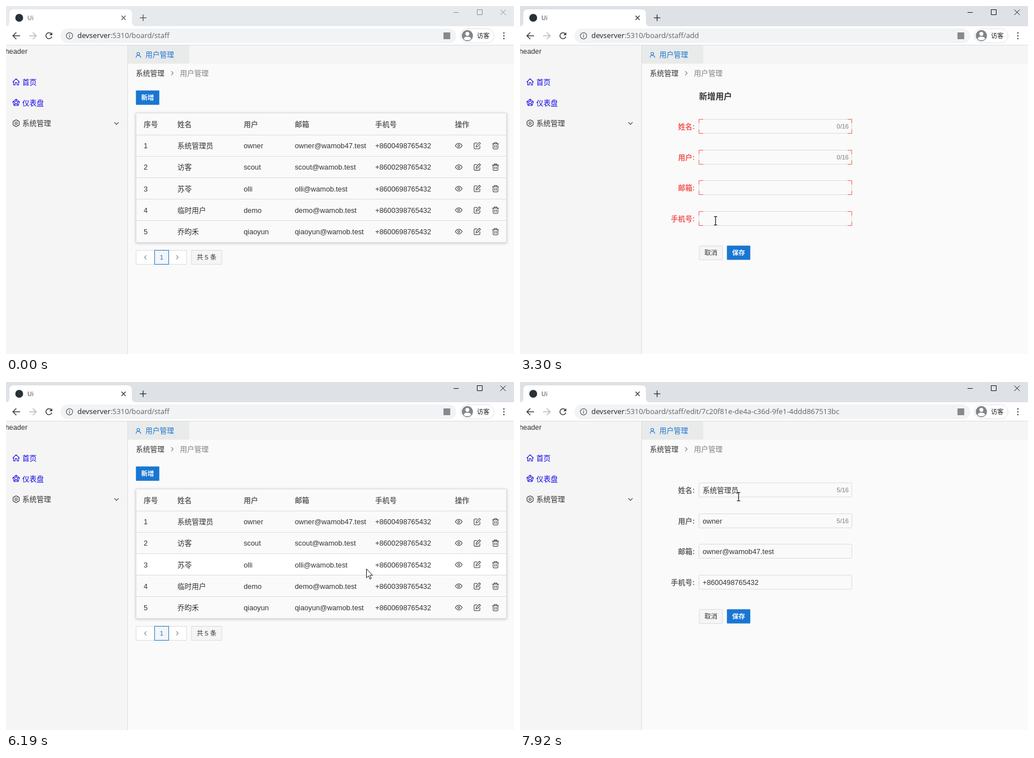
Animation of 904 by 619 pixels, one loop 7.99 s. Source, as an HTML page:

```html
<!DOCTYPE html>
<html lang="zh-CN">
<head>
<meta charset="utf-8">
<title>Ui</title>
<style>
html, body { margin: 0; width: 100%; height: 100%; overflow: hidden; background: #fafafa; }
svg { display: block; width: 904px; height: 619px; }
text { font: 12.74px "Liberation Sans", "Noto Sans CJK SC", "Noto Sans CJK", sans-serif; white-space: pre; }
.ui { font-family: "Open Sans", "Noto Sans CJK SC", "Noto Sans CJK", sans-serif; }
.icon { fill: none; stroke-width: 1.05; stroke-linejoin: round; stroke-linecap: round; }
</style>
</head>
<body>
<svg id="stage" viewBox="0 0 904 619"></svg>
<script>
const LOOP = 7990;
const BLUE = '#1976d2', INK = '#333', LINE = '#dcdcdc', RED = '#f45b57';
const stage = document.getElementById('stage');

const people = [
  ['系统管理员', 'owner', 'owner@wamob47.test', '+8600498765432'],
  ['访客', 'scout', 'scout@wamob.test', '+8600298765432'],
  ['苏苓', 'olli', 'olli@wamob.test', '+8600698765432'],
  ['临时用户', 'demo', 'demo@wamob.test', '+8600398765432'],
  ['乔昀禾', 'qiaoyun', 'qiaoyun@wamob.test', '+8600698765432']
];
const host = 'devserver', base = ':5310/board/staff';
const key = '7c20f81e-de4a-c36d-9fe1-4ddd867513bc';
const paths = { list: '', add: '/add', info: '/info/' + key, edit: '/edit/' + key };

// Drawing helpers
const text = (x, y, s, fill = INK, more = '') => `<text x="${x}" y="${y}" fill="${fill}" ${more}>${s}</text>`;
const rect = (x, y, w, h, fill, more = '') => `<rect x="${x}" y="${y}" width="${w}" height="${h}" fill="${fill}" ${more}/>`;
const line = (d, stroke = LINE, more = '') => `<path d="${d}" fill="none" stroke="${stroke}" ${more}/>`;
const icon = (x, y, d, color = INK) => `<path class="icon" transform="translate(${x} ${y})" d="${d}" stroke="${color}"/>`;
const group = (id, body, more = '') => `<g id="${id}" ${more}>${body}</g>`;
const middle = size => `text-anchor="middle" style="font-size:${size}px"`;

const glyph = {
  eye: 'M-6 0Q-3.5-4.2 0-4.2T6 0Q3.5 4.2 0 4.2T-6 0M-1.8 0a1.8 1.8 0 1 0 3.6 0a1.8 1.8 0 1 0-3.6 0',
  edit: 'M0-4.8H-4.2Q-5.4-4.8-5.4-3.6V4.2Q-5.4 5.4-4.2 5.4H3.6Q4.8 5.4 4.8 4.2V.5M-2 2.2L-1.5-.5L4-6L6-4L.6 1.5Z',
  trash: 'M-5.5-3.6H5.5M-2.3-3.6V-5.6H2.3V-3.6M-4.2-3.4V4.5Q-4.2 5.8-3 5.8H3Q4.2 5.8 4.2 4.5V-3.4M-1.4-.8V3M1.4-.8V3',
  home: 'M-6 .3L0-5.7L6 .3M-4.4-1V5.5H-1.6V1.3H1.6V5.5H4.4V-1',
  radar: 'M0-5.8L5.9-1.4L3.7 5.4H-3.7L-5.9-1.4ZM0-2.8L2.8-.7L1.8 2.6H-1.8L-2.8-.7ZM0-5.8V-2.8M5.9-1.4L2.8-.7M3.7 5.4L1.8 2.6M-3.7 5.4L-1.8 2.6M-5.9-1.4L-2.8-.7',
  gear: 'M-1.6-5.8H1.6L2.3-4L4.3-4.2L5.9-1.4L4.8 0L5.9 1.4L4.3 4.2L2.3 4L1.6 5.8H-1.6L-2.3 4L-4.3 4.2L-5.9 1.4L-4.8 0L-5.9-1.4L-4.3-4.2L-2.3-4ZM-2 0a2 2 0 1 0 4 0a2 2 0 1 0-4 0',
  user: 'M-3-2.1a2.4 2.4 0 1 0 4.8 0a2.4 2.4 0 1 0-4.8 0M-4.4 4.5Q-4.2.6-.6.4Q2.4.8 4.2 4.5',
  left: 'M1.6-3.2L-1.6 0L1.6 3.2',
  right: 'M-1.6-3.2L1.6 0L-1.6 3.2',
  down: 'M-3.6-1.7L0 1.8L3.6-1.7'
};

function chrome() {
  return rect(0, 0, 904, 36, '#dee1e6', 'id="bar"') +
    '<path d="M0 36Q6 36 6 29V14Q6 6 14 6H216Q224 6 224 14V29Q224 36 231 36Z" fill="#fff"/>' +
    '<circle cx="23.5" cy="21" r="7" fill="#263238"/>' +
    group('caption',
      text(38, 25, 'Ui', 'currentColor', 'class="ui" style="font-size:11.2px"') +
      line('M205.5 17.3l7.4 7.4m0-7.4l-7.4 7.4M238.3 21h11.4M244 15.3v11.4', 'currentColor', 'stroke-width="1.5"')) +
    group('controls', line('M796.5 11.5h9M838.5 6.5h9v9h-9zM879.8 6.5l9.4 9.4m0-9.4l-9.4 9.4', 'currentColor')) +
    rect(0, 36, 904, 33, '#fff') + rect(0, 69, 904, 1, '#dadce0') +
    line('M25 53H12.5M18.3 47L12.3 53l6 6', '#3c4043', 'stroke-width="1.6"') +
    line('M41 53H53.5M47.7 47l6 6-6 6', '#b9bbbe', 'stroke-width="1.6"') +
    line('M80.6 49.4A5.4 5.4 0 1 0 81.6 54.5', '#3c4043', 'stroke-width="1.6"') +
    '<path d="M82.3 46.8V52H77.1Z" fill="#3c4043"/>' +
    rect(97, 40, 704, 26, '#f1f3f4', 'rx="13"') +
    '<circle cx="113" cy="53" r="5.6" fill="none" stroke="#5f6368" stroke-width="1.2"/>' +
    line('M113 52v4M113 49.6v1.4', '#5f6368', 'stroke-width="1.3"') +
    `<text class="ui" x="127" y="57.3" fill="#202124" style="font-size:12.9px">${host}<tspan id="path" fill="#5f6368"></tspan></text>` +
    rect(778.5, 47, 12, 12, '#85898d') +
    rect(808.5, 40.5, 60, 25, '#fff', 'rx="12.5" stroke="#e0e2e5"') +
    '<circle cx="821" cy="52.8" r="10" fill="#80858a"/><circle cx="821" cy="49.6" r="3.5" fill="#fff"/>' +
    '<path d="M814.2 58.5Q815.5 54.6 821 54.6T827.8 58.5Q825 61 821 61T814.2 58.5" fill="#fff"/>' +
    text(838, 57, '访客', '#202124', 'style="font-size:11.3px"') +
    [48, 53, 58].map(y => `<circle cx="886" cy="${y}" r="1.4" fill="#5f6368"/>`).join('');
}

function shell() {
  const link = '#1408e8';
  return rect(0, 70, 904, 549, '#fafafa') + rect(0, 70, 216, 549, '#f5f5f5') +
    rect(217, 70, 687, 32.5, '#f5f5f5') + rect(217, 70, 109, 32.5, '#e9eaea') + rect(216, 70, 1, 549, LINE) +
    text(-1.5, 85.3, 'header') +
    icon(18, 135, glyph.home, link) + text(29, 140, '首页', link) +
    icon(18, 171.5, glyph.radar, link) + text(29, 176.5, '仪表盘', link) +
    icon(18, 208.5, glyph.gear) + text(29, 213, '系统管理') + icon(196.5, 208.8, glyph.down) +
    icon(236, 87, glyph.user, BLUE) + text(248, 91, '用户管理', BLUE) +
    text(231, 124, '系统管理') + icon(296, 119.5, glyph.right, '#666') + text(309.5, 124, '用户管理', '#808080');
}

function listView() {
  const cols = [245, 305, 423, 514, 657, 799];
  const top = i => 229 + i * 38.2;
  const bold = 'style="font-weight:600"';
  let out = rect(231.2, 150.3, 41.6, 25.4, BLUE, 'rx="1"') +
    text(252, 167.2, '新增', '#fff', 'text-anchor="middle" style="font-size:11.5px;font-weight:600"') +
    rect(231.5, 190.5, 659, 230, '#fafafa', 'stroke="#dedede" style="filter:drop-shadow(0 1.5px 2.5px rgba(0,0,0,.22))"') +
    rect(232, 229, 658, 38.2, '#fff', 'id="hover"');
  ['序号', '姓名', '用户', '邮箱', '手机号', '操作'].forEach((s, i) => out += text(cols[i], 215, s, '#666', bold));
  people.forEach((p, i) => {
    const y = top(i), mid = y + 19.5;
    out += line(`M232 ${Math.floor(y) + .5}H890`);
    [i + 1, ...p].forEach((s, c) => out += text(cols[c], (mid + 4.6).toFixed(1), s));
    ['eye', 'edit', 'trash'].forEach((n, c) => out += icon(805.7 + c * 32.7, mid.toFixed(1), glyph[n]));
  });
  return out +
    rect(231.5, 434.5, 90, 25, '#fff', `stroke="${LINE}"`) +
    rect(264.5, 434.5, 25, 25, '#f5f5f5', `stroke="${BLUE}"`) +
    icon(248, 447, glyph.left, '#777') + icon(305, 447, glyph.right, '#777') +
    text(277, 451, '1', BLUE, middle(11.4)) +
    rect(330, 434.5, 54, 25, '#f5f5f5', `stroke="${LINE}"`) +
    text(357, 451, '共 5 条', INK, middle(11.3));
}

function formView(kind) {
  const add = kind === 'add', info = kind === 'info';
  const dy = kind === 'edit' ? -22 : 0;
  const title = { add: '新增用户', info: '查看用户', edit: '' }[kind];
  let out = text(318.5, 166.4, title, INK, 'style="font-size:14.7px;font-weight:600"');
  ['姓名', '用户', '邮箱', '手机号'].forEach((label, i) => {
    const y = Math.round(201 + i * 54.6 + dy) + .5;
    out += text(311, y + 17, label + ':', add ? RED : '#666', 'text-anchor="end" style="font-weight:600"') +
      rect(318.5, y, 272, 25, info ? '#fff' : '#fafafa', `rx="1" stroke="${LINE}"`);
    if (add) out += line(`M326 ${y}H318.5V${y + 7}m0 11v7H326M583 ${y}h7.5v7m0 11v7H583`, RED);
    else out += text(325, y + 17, people[0][i], info ? '#7b7b7b' : INK);
    if (i < 2) out += text(585, y + 16, (add ? 0 : 5) + '/16', '#7b7b7b', 'text-anchor="end" style="font-size:11px"');
  });
  return out + rect(319, 426.5 + dy, 41.5, 25, '#f5f5f5', `rx="1" stroke="${LINE}"`) +
    text(339.7, 443 + dy, '取消', INK, middle(11.5)) +
    rect(368.2, 426.2 + dy, 41.6, 25.4, info ? '#8cbaea' : BLUE, 'rx="1"') +
    text(389, 443 + dy, '保存', info ? '#d9e9fa' : '#fff', 'text-anchor="middle" style="font-size:11.5px;font-weight:600"');
}

const bubble = '<path id="bubbleBox" fill="#f1f3f4" stroke="#c8cacd"/>' +
  text(4, 613.3, '', '#5f6368', 'id="bubbleText" class="ui" style="font-size:10.6px"');

const pointers =
  group('arrow', '<path d="M.5.5V16.2L4.1 12.8L6.6 18.6L9 17.5L6.5 11.9H11.4Z" fill="#fff" stroke="#111" stroke-linejoin="round"/>') +
  group('beam', line('M-3-7.5H-1Q0-7.5 0-6.5V6.5Q0 7.5-1 7.5H-3M3-7.5H1Q0-7.5 0-6.5V6.5Q0 7.5 1 7.5H3', '#111', 'stroke-width="1.2"')) +
  group('hand', '<path d="M-1.5 9V1Q-1.5-.5 0-.5T1.5 1V6Q4 4 4.4 6.3Q7 4.6 7.3 7Q10 5.7 10 8V12Q10 15 8 18H0Q-1 15-5 11Q-5.5 8-1.5 11Z" fill="#fff" stroke="#111" stroke-linejoin="round"/>');

const views = ['list', 'add', 'info', 'edit'];
stage.innerHTML = chrome() + shell() +
  views.map(v => group(v, v === 'list' ? listView() : formView(v))).join('') +
  group('bubble', bubble) + group('pointer', pointers);

const el = id => document.getElementById(id);
const show = (id, on) => el(id).setAttribute('display', on ? 'inline' : 'none');

// Timeline: [ms, view], [from, to, link] and [ms, x, y]
const pages = [[0, 'list'], [2430, 'add'], [3920, 'list'], [5020, 'info'], [5950, 'list'], [7360, 'edit']];
const hints = [[2290, 2950, 'add'], [4800, 5480, 'info'], [6980, 7600, 'edit']];
const track = [
  [70, 310, 566], [820, 258, 345], [1290, 246, 276], [1370, 246, 276], [1670, 250, 168], [1900, 253, 164],
  [2450, 253, 164], [2750, 290, 260], [3300, 348, 382], [3390, 348, 382], [3620, 344, 440], [3950, 344, 440],
  [4410, 829, 275], [4470, 829, 275], [4720, 806, 249], [5060, 806, 249], [5570, 326, 392], [5640, 326, 392],
  [5800, 341, 439], [5990, 341, 439], [6300, 760, 290], [6670, 814, 251], [6740, 814, 251], [6980, 839, 249],
  [7380, 839, 249], [7860, 389, 204.4], [7990, 389, 204.4]
];

function pointerAt(t) {
  const i = track.findIndex(k => k[0] > t);
  if (i < 1) return null;
  const [t0, x0, y0] = track[i - 1], [t1, x1, y1] = track[i];
  const u = (t - t0) / (t1 - t0), e = u * u * (3 - 2 * u);
  return { x: x0 + (x1 - x0) * e, y: y0 + (y1 - y0) * e };
}

function pointerKind(view, { x, y }) {
  const within = (a, b, c, d) => x >= a && x <= c && y >= b && y <= d;
  if (view === 'list') {
    const onIcon = y > 229 && y < 420 && Math.abs((y - 229) % 38.2 - 19.5) < 7 &&
      [0, 1, 2].some(c => Math.abs(x - 805.7 - c * 32.7) < 7);
    return onIcon || within(231, 150, 273, 176) ? 'hand' : 'arrow';
  }
  const dy = view === 'edit' ? -22 : 0;
  if (within(319, 426 + dy, 361, 452 + dy)) return 'hand';
  const inField = within(318, 201 + dy, 591, 391 + dy) && (y - 201 - dy) % 54.6 < 26;
  return inField && view !== 'info' ? 'beam' : 'arrow';
}

function drawBubble(t) {
  const hint = hints.find(h => t >= h[0] && t < h[1]);
  show('bubble', hint);
  if (!hint) return;
  const full = host + base + paths[hint[2]];
  const long = full.length > 48, w = long ? 300 : 180;
  el('bubbleText').textContent = long ? full.slice(0, 48) + '…' : full;
  el('bubbleBox').setAttribute('d', `M-1 600.5H${w - 4}Q${w} 600.5 ${w} 604.5V620H-1Z`);
  const fade = Math.min(1, (t - hint[0]) / 120, (hint[1] - t) / 200);
  el('bubble').setAttribute('opacity', fade.toFixed(2));
}

function draw(t) {
  const view = pages.filter(p => p[0] <= t).pop()[1];
  views.forEach(v => show(v, v === view));
  el('path').textContent = base + paths[view];

  const active = t >= 1600;
  el('bar').setAttribute('fill', active ? '#dee1e6' : '#e7eaed');
  el('caption').setAttribute('color', active ? '#3c4043' : '#5f6368');
  el('controls').setAttribute('color', active ? '#111' : '#8d8f92');

  const p = pointerAt(t);
  show('pointer', p);
  const row = p ? Math.floor((p.y - 229) / 38.2) : -1;
  show('hover', p && view === 'list' && row >= 0 && row < 5 && p.x > 232 && p.x < 890);
  if (p) {
    el('hover').setAttribute('y', 229 + row * 38.2);
    el('pointer').setAttribute('transform', `translate(${Math.round(p.x)} ${Math.round(p.y)})`);
    const kind = pointerKind(view, p);
    ['arrow', 'beam', 'hand'].forEach(k => show(k, k === kind));
  }
  drawBubble(t);
}

const start = performance.now();
function tick() {
  draw((performance.now() - start) % LOOP);
  requestAnimationFrame(tick);
}
tick();
</script>
</body>
</html>
```
